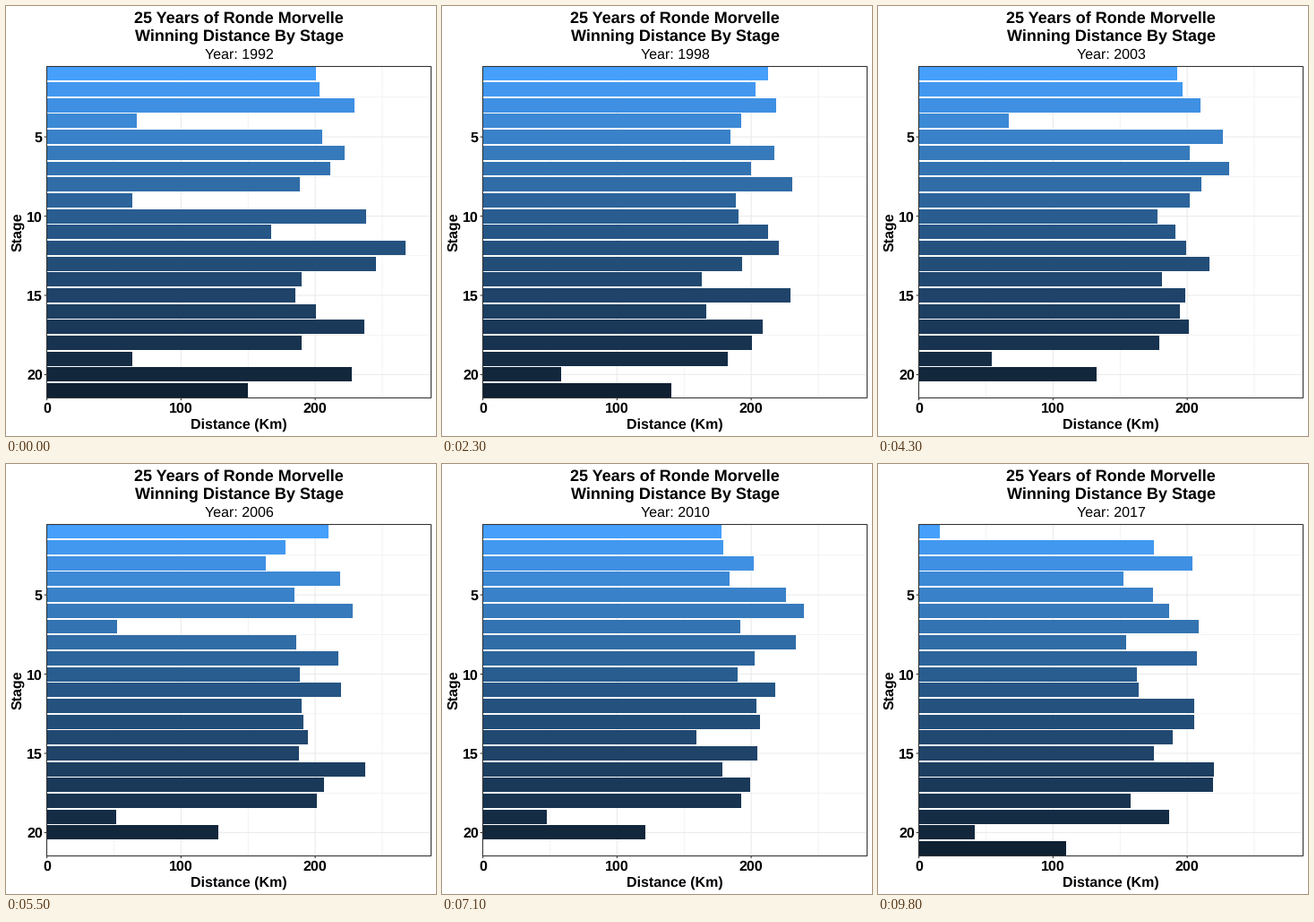
Animation of 480x480 px, one loop 10 s. Source, as a matplotlib script:

```python
import numpy as np
import matplotlib.pyplot as plt
from matplotlib.animation import FuncAnimation
from matplotlib.colors import LinearSegmentedColormap
from matplotlib.patches import Rectangle

SIZE, DPI = 480, 80
PX = 72 / DPI  # points per pixel
LEFT, RIGHT, TOP, BOTTOM = 45.65, 474.65, 67.4, 437.1
CENTER = 260
MAX_KM, STAGES = 286.5, 21
FIRST_YEAR, LAST_YEAR = 1992, 2017
FRAMES, INTERVAL = 100, 100

plt.rcParams["font.family"] = "Liberation Sans"
plt.rcParams["text.hinting"] = "none"

TWENTY_STAGE_YEARS = {1993, 1995, 1999, 2001, 2002, 2003, 2004, 2006, 2007,
                      2010, 2012}
SHORT_OPENING_YEARS = {2000, 2005, 2009, 2015, 2017}
TEAM_TRIAL_YEARS = {1992, 1993, 2000, 2001, 2002, 2003, 2004, 2005}
MID_TRIAL_YEARS = {1992, 1993, 1994, 1996, 2002, 2012, 2015}
# Single stages far from the rule: (year, stage) -> km
KEY_STAGES = {(1992, 12): 267.5, (1993, 12): 286.5, (1994, 6): 270.5,
              (1996, 8): 30.5, (1996, 17): 262, (2006, 7): 52,
              (2013, 4): 25, (2013, 11): 33, (2013, 17): 32}


def year_distances(year):
    """Distance of each stage; NaN where the year has no such stage."""
    count = STAGES - (year in TWENTY_STAGE_YEARS)
    age = year - FIRST_YEAR
    rng = np.random.default_rng(year)
    km = np.full(STAGES, np.nan)

    # Road stages get shorter and more alike over the years.
    road = rng.normal(210 - age, 24 - 0.3 * age, count)
    km[:count] = road.clip(145, 255)
    km[count - 1] = 150 - 1.6 * age

    trial = 64 - 0.9 * age
    if year != 2013:
        km[18 if year < 1996 or year == 2000 else count - 2] = trial
    if year in MID_TRIAL_YEARS:
        km[8] = trial
    if year in TEAM_TRIAL_YEARS:
        km[3] = 67
    if year in SHORT_OPENING_YEARS:
        km[0] = 15.5
    for (key_year, stage), value in KEY_STAGES.items():
        if key_year == year:
            km[stage - 1] = value
    return km


def x_of(km):
    return LEFT + km * (RIGHT - LEFT) / MAX_KM


def y_of(stage):
    return TOP + (stage - 0.55) * (BOTTOM - TOP) / (STAGES - 0.1)


def label(x, y, text, size=16, weight="bold", ha="center", **kwargs):
    return ax.text(x, y, text, fontsize=size * PX, weight=weight, ha=ha,
                   va="baseline", color="black", **kwargs)


def line(xs, ys, color, width, zorder):
    ax.plot(xs, ys, color=color, lw=width * PX, zorder=zorder,
            solid_capstyle="butt", snap=False)


def grid(kms, stages, width):
    for km in kms:
        line([x_of(km)] * 2, [TOP, BOTTOM], "#ebebeb", width, 1)
    for stage in stages:
        line([LEFT, RIGHT], [y_of(stage)] * 2, "#ebebeb", width, 1)


fig = plt.figure(figsize=(SIZE / DPI, SIZE / DPI), dpi=DPI, facecolor="white")
ax = fig.add_axes([0, 0, 1, 1])
ax.axis("off")

grid([50, 150, 250], [2.5, 7.5, 12.5, 17.5], 0.55)
grid([100, 200], [5, 10, 15, 20], 1.07)

shades = LinearSegmentedColormap.from_list(
    "stages", ["#459ffb", "#367abb", "#265685", "#1d3f62", "#0f2133"])
stage_numbers = np.arange(1, STAGES + 1)
bar_height = 0.9 * (y_of(2) - y_of(1))
bars = ax.barh(y_of(stage_numbers), np.zeros(STAGES), bar_height, left=LEFT,
               color=shades(np.linspace(0, 1, STAGES)), linewidth=0, zorder=2)
ax.add_patch(Rectangle((45.5, 67.5), 429, 370, fill=False, snap=False,
                       edgecolor="#333333", lw=1.07 * PX, zorder=3))

for km in (0, 100, 200):
    line([x_of(km)] * 2, [BOTTOM, BOTTOM + 3], "#333333", 1.07, 3)
    label(x_of(km), 454, str(km))
for stage in (5, 10, 15, 20):
    line([LEFT - 3, LEFT], [y_of(stage)] * 2, "#333333", 1.07, 3)
    label(40.8, y_of(stage) + 5.8, str(stage), ha="right")

label(CENTER, 19, "25 Years of Ronde Morvelle", 18)
label(CENTER, 38, "Winning Distance By Stage", 18)
subtitle = label(CENTER, 59, "", weight="normal")
label(CENTER, 472, "Distance (Km)")
label(17, (TOP + BOTTOM) / 2, "Stage", rotation=90, rotation_mode="anchor")

ax.set_xlim(0, SIZE)
ax.set_ylim(SIZE, 0)

seasons = [year_distances(y) for y in range(FIRST_YEAR, LAST_YEAR + 1)]


def position(frame):
    """Place on the year axis; halves are the single in-between pictures."""
    last = LAST_YEAR - FIRST_YEAR
    if frame >= FRAMES - 3:
        return last - 0.5 * (frame == FRAMES - 3)
    index, phase = divmod(frame + 1, 4)
    return index + 0.5 * (phase == 3)


def update(frame):
    place = position(frame)
    before, after = int(np.floor(place)), int(np.ceil(place))
    distances = (seasons[before] + seasons[after]) / 2
    for bar, km in zip(bars, distances):
        bar.set_visible(not np.isnan(km))
        bar.set_width(x_of(np.nan_to_num(km)) - LEFT)
    subtitle.set_text(f"Year: {FIRST_YEAR + after}")
    return [*bars, subtitle]


anim = FuncAnimation(fig, update, frames=FRAMES, interval=INTERVAL,
                     repeat=True, repeat_delay=0)
plt.show()
```
